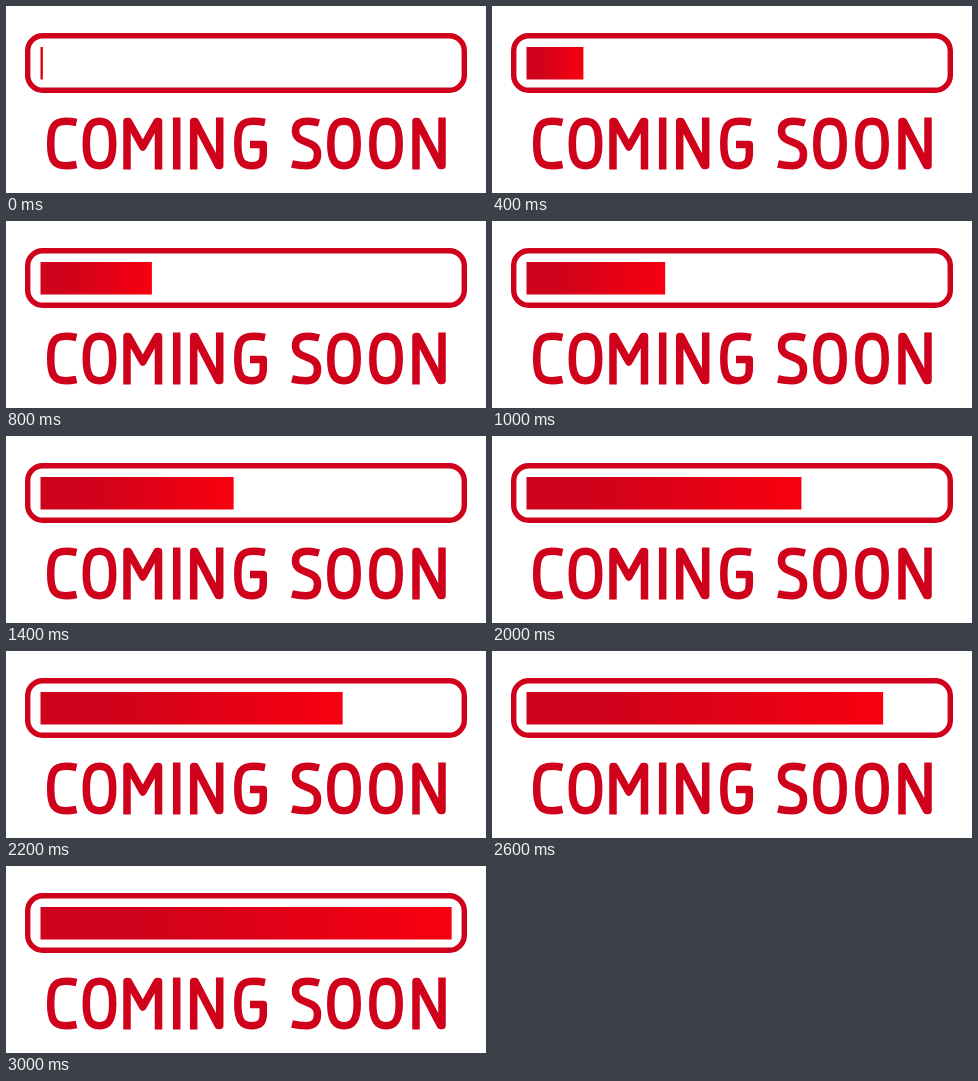
An HTML page that plays this animation: 480x187 px, repeating every 4060 ms.

```html
<!DOCTYPE html>
<html lang="en">
<head>
<meta charset="utf-8">
<title>Coming soon</title>
<style>
  html, body { margin: 0; width: 100%; height: 100%; overflow: hidden; background: #fff; }
  svg { display: block; width: 480px; height: 187px; }
  .outline { fill: none; stroke: #d0021b; }
</style>
</head>
<body>
<svg viewBox="0 0 480 187" role="img" aria-label="COMING SOON">
  <defs>
    <linearGradient id="glow">
      <stop offset="0.25" stop-color="#d0021b"/>
      <stop offset="1" stop-color="#f8000f"/>
    </linearGradient>
    <path id="O" d="M-13.2 137.5C-13.2 121-9 115.3 0 115.3S13.2 121 13.2 137.5 9 159.7 0 159.7-13.2 154-13.2 137.5Z"/>
    <path id="N" d="M-13 163.5V115.5H-11.5L11.5 159.5H13V111.5"/>
  </defs>

  <rect class="outline" x="21.7" y="29.7" width="436.6" height="54.6" rx="15" stroke-width="5.4"/>
  <rect id="bar" x="34.5" y="41" height="32.5" fill="url(#glow)"/>

  <!-- Condensed lettering, one stroke per letter -->
  <g class="outline" stroke-width="7.5" stroke-linejoin="round">
    <path d="M70.5 116.5Q65 115.3 60 115.3C48 115.3 44.7 121 44.7 137.5S48 159.7 60 159.7Q65 159.7 70.5 158.5"/>
    <use href="#O" x="93.5"/>
    <path d="M121 163.5V115.5H122.5L136.8 141L151 115.5H152.5V163.5"/>
    <path d="M170.7 111.5V163.5"/>
    <use href="#N" x="200.7"/>
    <path d="M259 116.5Q253 115.3 247 115.3C235.5 115.3 231.8 121 231.8 137.5S235.5 159.7 245.5 159.7 257.3 155 257.3 147V138.5H244"/>
    <path d="M313 117Q307 115.3 302 115.3C293 115.3 289.5 119 289.5 125C289.5 139 311.5 133 311.5 148C311.5 156 308 159.7 300 159.7Q293 159.7 286 158"/>
    <use href="#O" x="338"/>
    <use href="#O" x="380"/>
    <use href="#N" x="423"/>
  </g>
</svg>
<script>
  const LOOP = 4060, STEP = 200, LAST_STEP = 15;
  const bar = document.getElementById("bar");

  function draw(now) {
    const step = Math.min(LAST_STEP, Math.floor((now % LOOP) / STEP));
    bar.setAttribute("width", 2.4 + 27.25 * step);
    requestAnimationFrame(draw);
  }
  draw(performance.now());
</script>
</body>
</html>
```
